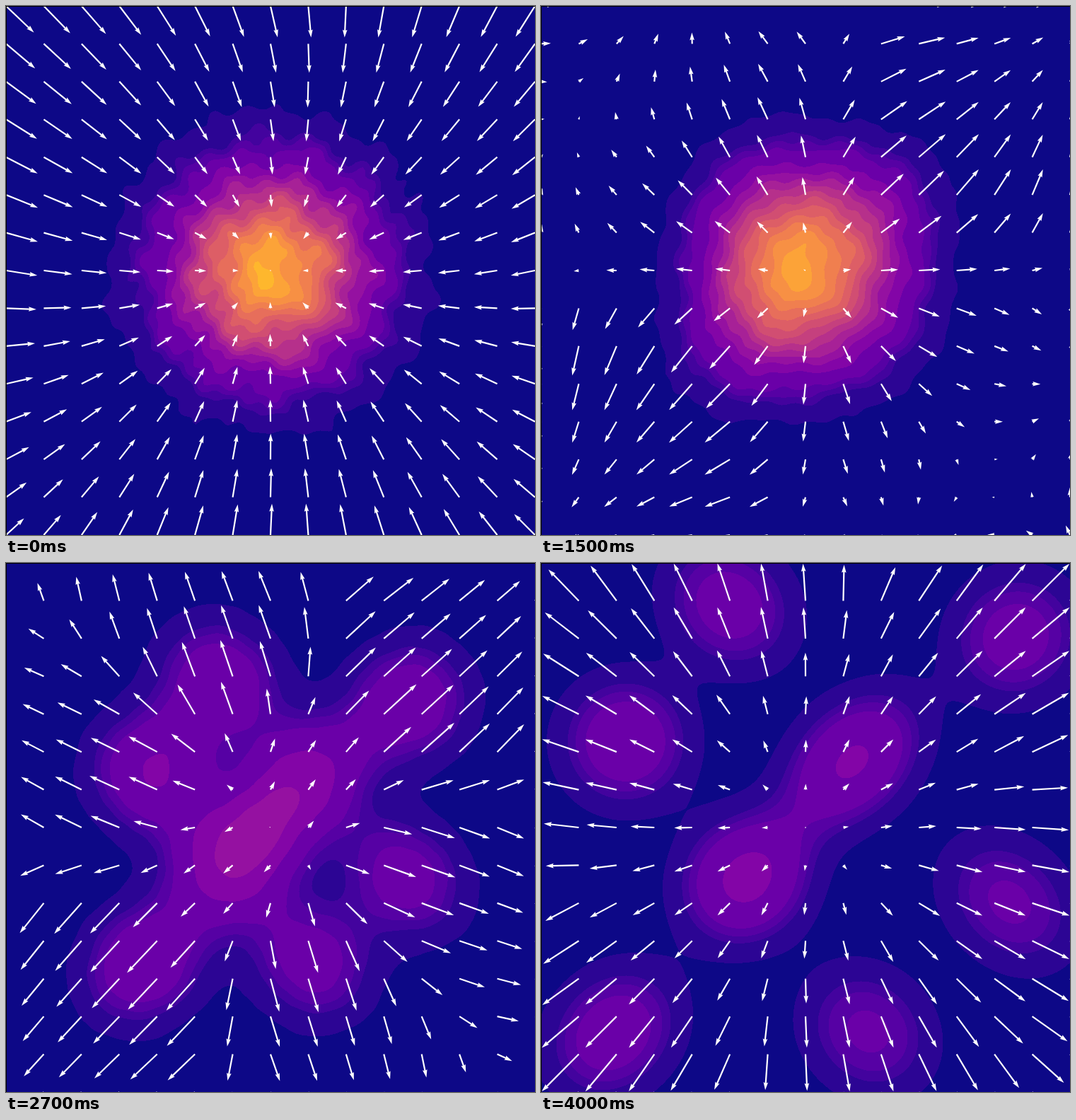
These frames come from a looping animation (748 px wide and 748 px high, 4100 ms). An HTML page with a canvas:

```html
<!DOCTYPE html>
<html lang="en">
<head>
<meta charset="utf-8">
<title>Flow field</title>
<style>
  html, body { margin: 0; width: 748px; height: 748px; overflow: hidden; background: #0d0887; }
  canvas { display: block; }
</style>
</head>
<body>
<canvas id="stage" width="748" height="748"></canvas>
<script>
const SIZE = 748, MID = SIZE / 2, STEP_MS = 100, STEPS = 41;
const START_VAR = 98 * 98, BLOB_VAR = 4600, FLOW_VAR = 5000;
const ARROW_SCALE = 0.165, ARROW_GRID = 14, SHAFT = 2.2;
const CELL = 4, SIDE = SIZE / CELL + 1;

// Each mode: final offset from the middle, weight, tilt of its ellipse.
const modes = [
  [-108, -315, 0.95, -0.15], [297, -270, 0.95, 0.05],
  [-255, -122, 1.05, 0], [66, -94, 1.2, 0.35],
  [-85, 73, 1.25, 0.1], [288, 105, 0.85, -0.25],
  [88, 288, 0.85, -0.15], [-272, 290, 1, 0.2]
].map(([x, y, weight, tilt]) => ({ x, y, weight, tilt }));

const palette = ('0d0887 2c0594 43039e 5601a4 6a00a8 8305a7 9511a1 a72197 b6308b c5407e ' +
  'd14e72 dd5e66 e76e5b f07f4f f79044 fca338 feb72d fccd25 f7e425 f0f921')
  .split(' ').map(hex => {
    const n = parseInt(hex, 16);
    return (255 << 24 | (n & 255) << 16 | (n & 0xff00) | n >> 16) >>> 0;
  });
const lowLevels = [0, 0.05, 0.11, 0.135, 0.165, 0.24];
const LUT_SIZE = 1000;
const lut = Uint32Array.from({ length: LUT_SIZE }, (_, i) => {
  const value = i / LUT_SIZE;
  let band = Math.min(19, Math.floor(value * 20));
  if (value < 0.29) band = lowLevels.filter(level => value >= level).length - 1;
  return palette[band];
});

const ctx = document.getElementById('stage').getContext('2d');
const image = ctx.createImageData(SIZE, SIZE);
const pixels = new Uint32Array(image.data.buffer);
const grid = new Float32Array(SIDE * SIDE);

const variance = (t, endVar) => (1 - t) ** 2 * START_VAR + t * t * endVar;

function ripple(x, y, seed) {
  return Math.sin(x * 0.061 + y * 0.035 + seed) +
    Math.sin(y * 0.072 - x * 0.031 + seed * 2.3) +
    0.7 * Math.sin(x * 0.127 - y * 0.096 + seed * 3.7) +
    0.5 * Math.sin(x * 0.155 + y * 0.142 + seed * 5.1);
}

// Blobs leave the middle slowly, then flatten at the top as they separate.
function paintDensity(t) {
  const rough = Math.max(0, 1 - 1.3 * t);
  const travel = t * (1 - 0.6 * (1 - t) ** 3);
  const v = variance(t, BLOB_VAR) + 7000 * t * t * (1 - t);
  const power = 1 + 0.25 * t;

  function density(x, y) {
    const px = x + 5 * rough * ripple(x, y, 1.2);
    const py = y + 5 * rough * ripple(x, y, 4.1);
    let sum = 0;
    for (const m of modes) {
      const dx = px - travel * m.x, dy = py - travel * m.y;
      const q = dx * dx + dy * dy + 2 * m.tilt * t * dx * dy;
      sum += m.weight * Math.exp(-((q / (2 * v)) ** power));
    }
    return 0.098 * START_VAR / v * sum * (1 + 0.02 * rough * ripple(x, y, 2.6));
  }

  for (let j = 0; j < SIDE; j++) {
    for (let i = 0; i < SIDE; i++) {
      grid[j * SIDE + i] = density(i * CELL - MID, j * CELL - MID);
    }
  }
  for (let y = 0; y < SIZE; y++) {
    const j = Math.floor(y / CELL), fy = y / CELL - j;
    for (let x = 0; x < SIZE; x++) {
      const i = Math.floor(x / CELL), fx = x / CELL - i, k = j * SIDE + i;
      const top = grid[k] + (grid[k + 1] - grid[k]) * fx;
      const low = grid[k + SIDE] + (grid[k + SIDE + 1] - grid[k + SIDE]) * fx;
      const value = top + (low - top) * fy;
      pixels[y * SIZE + x] = lut[Math.min(LUT_SIZE - 1, Math.floor(value * LUT_SIZE))];
    }
  }
  ctx.putImageData(image, 0, 0);
}

// Mean velocity of the mixture, levelling off far from the modes.
function velocity(x, y, t) {
  const v = variance(t, FLOW_VAR);
  const growth = (t * FLOW_VAR - (1 - t) * START_VAR) / v;
  const reach = growth > 0 ? 120 : 330;
  const parts = modes.map(m => {
    const dx = x - t * m.x, dy = y - t * m.y, d = Math.hypot(dx, dy);
    const pull = d ? growth * reach * Math.tanh(d / reach) / d : 0;
    return { vx: m.x + pull * dx, vy: m.y + pull * dy, cost: d * d / (2 * v), weight: m.weight };
  });
  const least = Math.min(...parts.map(p => p.cost));
  let vx = 0, vy = 0, total = 0;
  for (const p of parts) {
    const w = p.weight * Math.exp(least - p.cost);
    vx += w * p.vx;
    vy += w * p.vy;
    total += w;
  }
  vx *= ARROW_SCALE / total;
  vy *= ARROW_SCALE / total;

  const r = Math.hypot(x, y);
  if (r > 220) {
    const drag = 0.11 * Math.max(0, 1 - ((t - 0.62) / 0.34) ** 2) * (r - 220) / r;
    vx -= drag * x;
    vy -= drag * y;
  }
  const X = x / MID, Y = y / MID, skew = Math.max(0, 1 - 2.5 * t);
  vx += skew * (1.4 + 6 * Y * Y - 4 * Y + 5 * X + 5 * X * X - 9 * X * X * Y * Y + 3 * X * Y);
  vy += skew * (1.7 + 7 * X * X + 2 * X * X * Y - 3 * X * Y);
  return [vx, vy];
}

function drawArrow(x, y, vx, vy) {
  const length = Math.hypot(vx, vy);
  ctx.save();
  ctx.translate(x, y);
  ctx.rotate(Math.atan2(vy, vx));
  ctx.beginPath();
  if (length < SHAFT / 2) {
    ctx.arc(0, 0, 0.8, 0, 2 * Math.PI);
  } else {
    const w = SHAFT * Math.min(1, length / (5 * SHAFT));
    const neck = length - 4.5 * w, barb = length - 5 * w;
    ctx.moveTo(0, -w / 2);
    ctx.lineTo(neck, -w / 2);
    ctx.lineTo(barb, -1.5 * w);
    ctx.lineTo(length, 0);
    ctx.lineTo(barb, 1.5 * w);
    ctx.lineTo(neck, w / 2);
    ctx.lineTo(0, w / 2);
  }
  ctx.fill();
  ctx.restore();
}

function draw(step) {
  const t = step / (STEPS - 1);
  paintDensity(t);
  ctx.fillStyle = '#fff';
  for (let j = 0; j <= ARROW_GRID; j++) {
    for (let i = 0; i <= ARROW_GRID; i++) {
      const x = i * SIZE / ARROW_GRID, y = j * SIZE / ARROW_GRID;
      drawArrow(x, y, ...velocity(x - MID, y - MID, t));
    }
  }
  ctx.fillStyle = '#000';
  ctx.fillRect(0, 0, SIZE, 1);
  ctx.fillRect(0, 0, 1, SIZE);
}

let shown = -1;
const start = performance.now();
function tick() {
  const step = Math.floor((performance.now() - start) / STEP_MS) % STEPS;
  if (step !== shown) {
    shown = step;
    draw(step);
  }
  requestAnimationFrame(tick);
}
tick();
</script>
</body>
</html>
```
